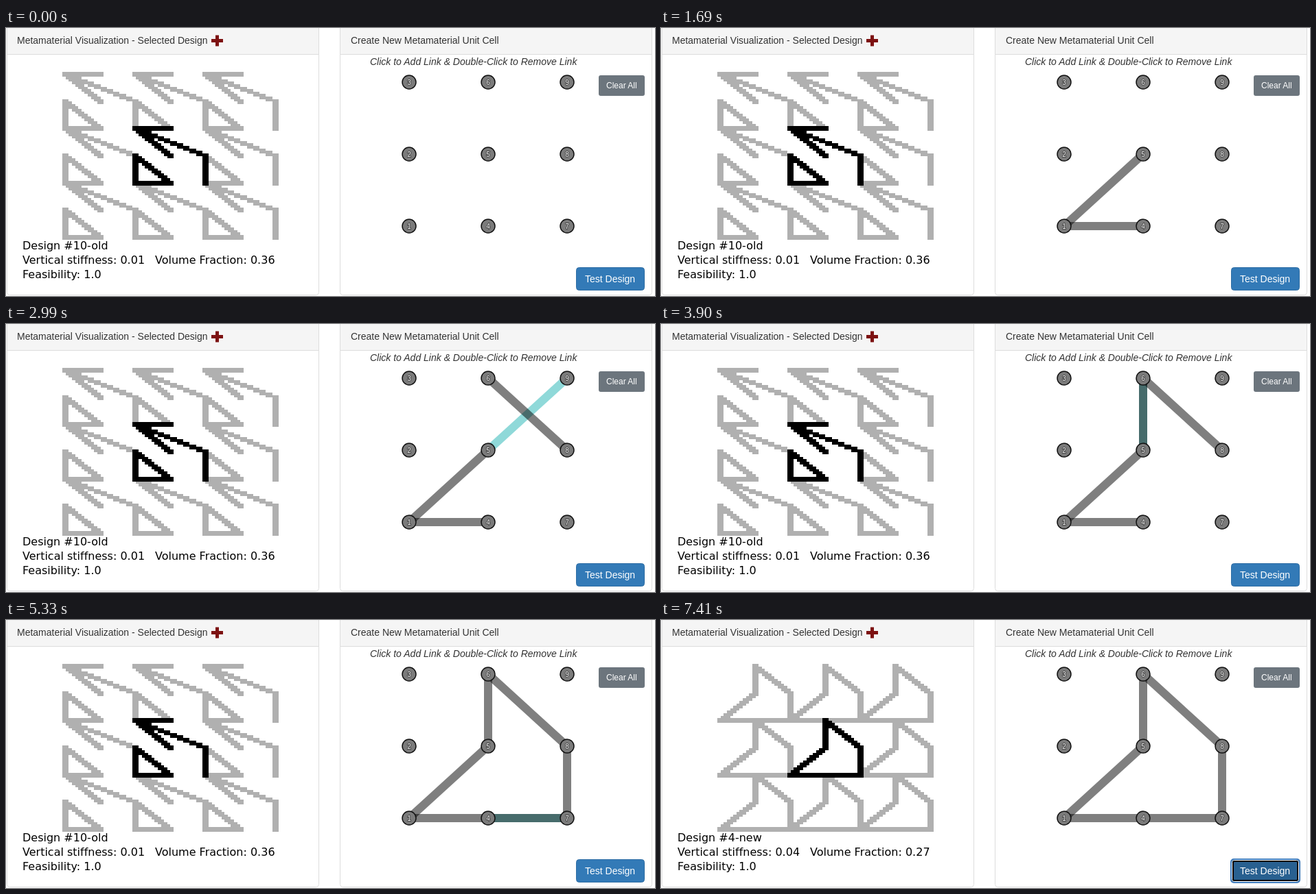
These frames come from a looping animation (945x391 px, 8000 ms). An HTML page:

```html
<!DOCTYPE html>
<html lang="en">
<head>
<meta charset="utf-8">
<title>Metamaterial unit cell</title>
<style>
  html, body { margin: 0; width: 100%; height: 100%; overflow: hidden; background: #fff; }
  svg { display: block; }
  text { font: 14px "Liberation Sans", Arial, sans-serif; fill: #333; }
  .info text { font: 16px "DejaVu Sans", Verdana, sans-serif; fill: #000; font-variant-ligatures: none; }
  .node circle { fill: #7b7b7b; stroke: #111; stroke-width: 1.5; }
  .node text { font-size: 10px; text-anchor: middle; fill: #fff; stroke: #333; stroke-width: 1.5; paint-order: stroke; }
  .links path { fill: none; stroke-width: 12; }
</style>
</head>
<body>
<svg width="945" height="391" viewBox="0 0 945 391">
  <rect width="945" height="391" fill="#fff"/>
  <g id="panels"></g>
  <text x="16" y="23">Metamaterial Visualization - Selected Design</text>
  <path d="M299 18.5H316M307.5 10.5V26.5" stroke="#7d1212" stroke-width="5"/>
  <text x="502" y="23">Create New Metamaterial Unit Cell</text>
  <text x="530" y="54" font-style="italic" style="font-style:italic">Click to Add Link &amp; Double-Click to Remove Link</text>

  <g transform="translate(82 64) scale(4.632 3.603)" shape-rendering="crispEdges">
    <path id="tiles" fill="#b0b0b0"/>
    <path id="cell" fill="#000"/>
  </g>
  <g class="info">
    <text id="name" x="24" y="323"></text>
    <text id="stiff" x="24" y="344"></text>
    <text id="volume" x="217" y="344"></text>
    <text x="24" y="365">Feasibility: 1.0</text>
  </g>

  <g class="links">
    <path id="hover" stroke="#8fd9d9"/>
    <g id="links"></g>
  </g>
  <g id="nodes"></g>

  <rect x="863" y="69" width="67" height="30" rx="3" fill="#6c757d"/>
  <text x="874" y="88" style="font-size:12px;fill:#fff">Clear All</text>
  <rect id="button" x="830.5" y="349.5" width="99" height="33" rx="4"/>
  <g id="focus" fill="none">
    <rect x="830" y="349" width="100" height="34" rx="4" stroke="#3f7cbd" stroke-width="2"/>
    <rect x="831.5" y="350.5" width="97" height="31" rx="3" stroke="#fff"/>
    <rect x="833" y="352" width="94" height="28" rx="2" stroke="#080808" stroke-width="2"/>
  </g>
  <text x="843" y="371" style="fill:#fff">Test Design</text>
</svg>
<script>
const $ = id => document.getElementById(id);
const LOOP = 8000, STEP = 11;

// nodes are numbered upwards, column by column
const col = n => Math.floor((n - 1) / 3);
const row = n => 2 - (n - 1) % 3;
const pos = n => [587 + 115 * col(n), 79 + 105 * row(n)];
const linkPath = ([a, b]) => `M${pos(a)}L${pos(b)}`;

const designs = [
  { name: 'Design #10-old', stiff: '0.01', volume: '0.36',
    links: ['36', '35', '38', '21', '14', '24', '87'] },
  { name: 'Design #4-new', stiff: '0.04', volume: '0.27',
    links: ['14', '47', '78', '86', '65', '51'] }
];
const added = ['14', '15', '68', '56', '87', '47'];

// [time, number of links, hovered link, button state, design]
const states = [
  [0, 0, '', 0, 0],
  [650, 1, '14', 0, 0],
  [1040, 1, '15', 0, 0],
  [1170, 2, '15', 0, 0],
  [1690, 2, '', 0, 0],
  [1820, 2, '59', 0, 0],
  [1950, 2, '68', 0, 0],
  [2340, 3, '68', 0, 0],
  [2730, 3, '', 0, 0],
  [2990, 3, '59', 0, 0],
  [3120, 3, '', 0, 0],
  [3510, 3, '56', 0, 0],
  [3900, 4, '56', 0, 0],
  [4030, 4, '', 0, 0],
  [4290, 4, '87', 0, 0],
  [4680, 5, '87', 0, 0],
  [4810, 5, '47', 0, 0],
  [5330, 6, '47', 0, 0],
  [5460, 6, '', 0, 0],
  [5720, 6, '', 1, 0],
  [5850, 6, '', 2, 0],
  [5980, 6, '', 2, 1]
];

// stair-stepped line of small blocks between two nodes
function pixelLine([a, b], ox, oy) {
  const x = col(a) * STEP, y = row(a) * STEP;
  const dx = col(b) * STEP - x, dy = row(b) * STEP - y;
  const n = Math.max(Math.abs(dx), Math.abs(dy));
  const w = dx && dy && Math.abs(dx) !== Math.abs(dy) ? 1 : 2;
  let d = '';
  for (let i = 0; i <= n; i++) {
    const px = ox + x + Math.floor(dx * i / n), py = oy + y + Math.floor(dy * i / n);
    d += `M${px} ${py}h${w}v2h-${w}z`;
  }
  return d;
}
const pixelCell = (links, i, j) =>
  links.map(l => pixelLine(l, i * 2 * STEP, j * 2 * STEP)).join('');

for (const d of designs) {
  d.cell = pixelCell(d.links, 1, 1);
  d.tiles = '';
  for (let k = 0; k < 9; k++) d.tiles += pixelCell(d.links, k % 3, Math.floor(k / 3));
}

$('panels').innerHTML = [1.5, 486.5].map(x =>
  `<rect x="${x}" y="-4.5" width="454" height="394" rx="4" fill="#fff" stroke="#ddd"/>
   <path d="M${x + .5} 0h453v38h-453z" fill="#f5f5f5"/>
   <path d="M${x} 38.5h454" stroke="#ddd"/>`).join('');

$('links').innerHTML = added.map(l =>
  `<path d="${linkPath(l)}" stroke="#000" stroke-opacity=".5"/>`).join('');

for (let n = 1; n <= 9; n++) {
  const [x, y] = pos(n);
  $('nodes').innerHTML += `<g class="node"><circle cx="${x}" cy="${y}" r="10"/>
    <text x="${x}" y="${y + 3.5}">${n}</text></g>`;
}

const lines = [...$('links').children];
let last;

function draw(t) {
  const state = states.filter(s => s[0] <= t).pop();
  if (state === last) return;
  last = state;
  const [, count, hover, button, index] = state;
  const design = designs[index];
  lines.forEach((l, i) => l.setAttribute('visibility', i < count ? 'visible' : 'hidden'));
  $('hover').setAttribute('d', hover ? linkPath(hover) : '');
  $('button').setAttribute('fill', button ? '#286090' : '#337ab7');
  $('button').setAttribute('stroke', button ? '#204d74' : '#2e6da4');
  $('focus').setAttribute('visibility', button > 1 ? 'visible' : 'hidden');
  $('tiles').setAttribute('d', design.tiles);
  $('cell').setAttribute('d', design.cell);
  $('name').textContent = design.name;
  $('stiff').textContent = `Vertical stiffness: ${design.stiff}`;
  $('volume').textContent = `Volume Fraction: ${design.volume}`;
}

const start = performance.now();
function tick() {
  draw((performance.now() - start) % LOOP);
  requestAnimationFrame(tick);
}
tick();
</script>
</body>
</html>
```
